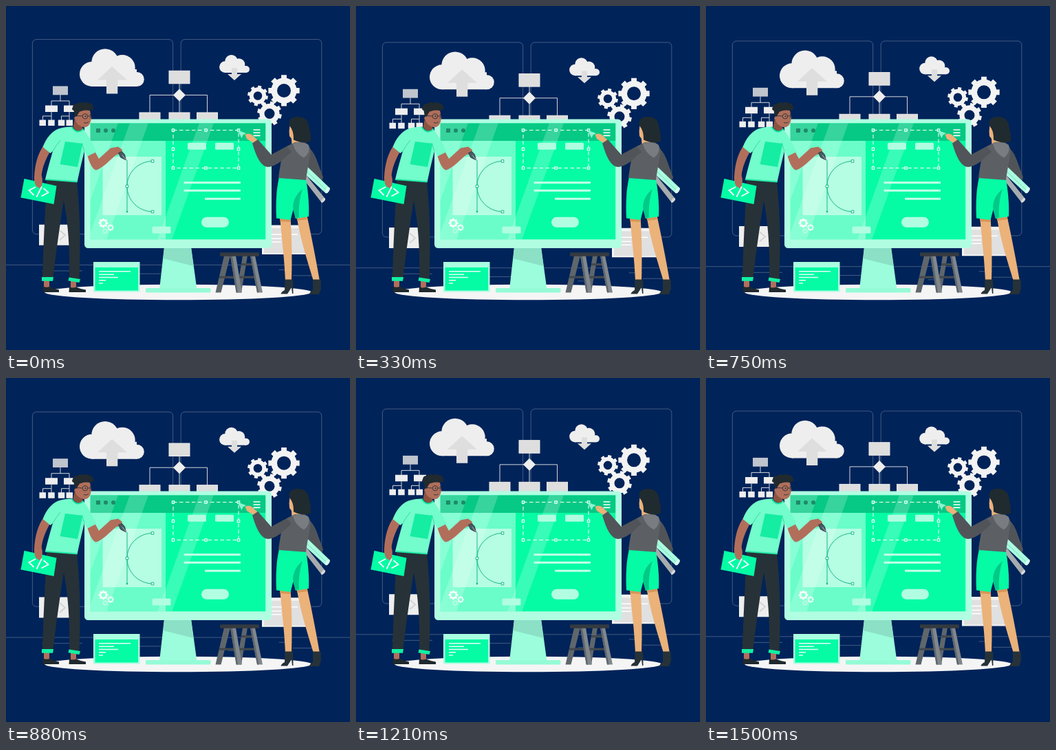
Write an HTML page that moves like this. It is 500 by 500 pixels and loops after 1540 ms.

```html
<!DOCTYPE html>
<html lang="en">
<head>
<meta charset="utf-8">
<title>Web design team</title>
<style>
  html, body { margin: 0; width: 100%; height: 100%; overflow: hidden; background: #002359; }
  svg { display: block; width: 100vw; height: 100vh; }
  .line { fill: none; stroke: #ebebeb; stroke-width: .9; }
  .thin { fill: none; stroke: #ebebeb; stroke-width: .5; stroke-opacity: .55; }
  .pale { fill: #eeeeee; }
  .box { fill: #dedede; stroke: #ebebeb; stroke-width: 1; }
  .green { fill: #06fba5; }
  .mint { fill: #b0fde2; }
  .dark { fill: #263238; }
  .brown { fill: #b16f5b; }
  .skin { fill: #ebb27a; }
  .stroke { fill: none; stroke: #fff; }
</style>
</head>
<body>
<svg viewBox="0 0 500 500" xmlns="http://www.w3.org/2000/svg">
  <g id="back">
    <rect class="thin" x="38.4" y="48.6" width="204.2" height="283" rx="5.7"/>
    <rect class="thin" x="254.2" y="48.6" width="204.6" height="283" rx="5.7"/>
    <path class="thin" d="M0 376.4H500M52.5 385H95.6M104.6 385h6.3M131.5 389.2h93.7M416.8 391.9h33.1M396.6 383.5h19.2M322.5 395.5h8.7"/>

    <!-- clouds -->
    <g class="pale">
      <path d="M125 117V92H190V117Z"/>
      <circle cx="125" cy="99" r="18"/>
      <circle cx="144" cy="82" r="19.7"/>
      <circle cx="169" cy="89.7" r="18.7"/>
      <circle cx="190.3" cy="106.5" r="10.5"/>
      <path d="M318 97V87H349V97Z"/>
      <circle cx="318.4" cy="88.7" r="8.3"/>
      <circle cx="327.6" cy="80.3" r="9.3"/>
      <circle cx="338.5" cy="85" r="8.8"/>
      <circle cx="349" cy="92" r="5"/>
    </g>
    <path fill="#dedede" d="M154 88L176 107.5H162.3V127.5H146V107.5H133ZM328 90h8v9h6l-10 9-10-9h6Z"/>

    <g id="gears" fill="#f3f3f3" fill-rule="evenodd"></g>

    <!-- flow charts -->
    <path class="line" d="M252 113V156M209 156V129.500H292.500V156"/>
    <path class="pale" d="M252 120.500l9 9-9 9-9-9Z"/>
    <rect class="box" x="237" y="94.300" width="30" height="18.500"/>
    <rect class="box" x="194" y="155" width="30" height="18"/>
    <rect class="box" x="237" y="155" width="30" height="18"/>
    <rect class="box" x="277.500" y="155" width="30" height="18"/>
    <path class="line" d="M79 129V138M66 145V138H92V145M66 154V160M53.500 166V160H66V166M92 154V160M80.500 166V160H92V166"/>
    <rect x="68" y="116.500" width="22" height="12.800" fill="#bfc4cd"/>
    <path class="pale" d="M57 144.500h18v9.500H57ZM84 144.500h18v9.500H84ZM48.500 165.500h9.500v8.500h-9.500ZM61.200 165.500h9.500v8.500h-9.500ZM75.800 165.500h9.500v8.500h-9.500ZM87.500 165.500h9.500v8.500h-9.500Z"/>

    <!-- cards -->
    <path class="pale" d="M48 317.800H95V347.800H48Z"/>
    <path d="M78 326l8 7-8 7" fill="none" stroke="#d4d4d4" stroke-width="2"/>
    <path fill="#f3f3f3" d="M372 318.500H438V361H372Z"/>
    <path fill="#e0e0e0" d="M375 323H436V359H375Z"/>
    <path class="stroke" stroke-width="1.500" d="M380 332H424M380 338H400M380 343H400"/>
  </g>

  <ellipse cx="250" cy="416" rx="194" ry="11.300" fill="#f5f5f5"/>

  <!-- monitor -->
  <path fill="#9bfddb" d="M230 350H269L277.500 412H223Z"/>
  <path fill="#8be0c5" d="M230 352H269L272.500 378L228.500 367Z"/>
  <rect x="203" y="410" width="94.500" height="6.500" rx="1.500" fill="#95fbd7"/>
  <rect class="mint" x="114" y="164.500" width="272" height="187.500" rx="5.500"/>
  <clipPath id="screen"><path d="M122.700 170.500H377.200V339.200H122.700Z"/></clipPath>
  <g clip-path="url(#screen)">
    <path class="green" d="M122 170H378V340H122Z"/>
    <path fill="#fff" opacity=".4" d="M122 196H232V340H122Z"/>
    <path fill="#05c984" d="M122 170H378V196H122Z"/>
    <path fill="#fff" opacity=".2" d="M122 170H163L122 284ZM180 170H207L146 340H122V331ZM281 170H302L241 340H220Z"/>
  </g>
  <g fill="#1d8a69">
    <path d="M131 178h6v6h-6Z"/><circle cx="145" cy="181" r="3"/><circle cx="156" cy="181" r="3"/>
  </g>
  <path class="stroke" stroke-width="1.600" d="M359.500 180H369.500M359.500 184.200H369.500M359.500 188.400H369.500"/>
  <path fill="#fff" opacity=".5" d="M140.500 219H226V304H140.500Z"/>
  <path d="M213 225.500C192 226 176 242 176 262S192 298.500 213 299M176 224V299" fill="none" stroke="#12b985"/>
  <circle cx="176" cy="299" r="1.300" fill="#12b985"/>
  <path fill="#fff" stroke="#12b985" d="M211.200 223.700h3.600v3.600h-3.600ZM211.200 297.200h3.600v3.600h-3.600ZM174.200 260.200h3.600v3.600h-3.600Z"/>
  <path class="stroke" stroke-width="1" stroke-dasharray="5.500 3.500" d="M243 180.500H338V235.500H243Z"/>
  <g id="handles" class="green" stroke="#fff" stroke-width="1.100"></g>
  <g class="mint">
    <rect x="264" y="198.700" width="27" height="10" rx="1.500"/>
    <rect x="304" y="198.700" width="27" height="10" rx="1.500"/>
    <rect x="284" y="306.700" width="40" height="15" rx="7.500"/>
    <rect x="212.500" y="320.500" width="27" height="10" rx="1.500"/>
  </g>
  <path d="M258.500 256.700H341M258.500 268.200H341M289 280.200H341" stroke="#c4ffea" stroke-width="3"/>
  <g id="cogs" fill-rule="evenodd"></g>

  <!-- small window -->
  <path fill="#a9fde0" d="M127 372H194.500V415.500H127Z"/>
  <path class="green" d="M129.500 380H192V413.500H129.500Z"/>
  <path stroke="#e4fff6" stroke-width="1.500" d="M135 385.800H181M135 390.300H157M135 394.500H163M135 398.800H145M135 403H141"/>

  <!-- stool -->
  <path fill="#5f666b" d="M344 363h7L342 416.500h-7ZM317 363h9L312.500 416.500H304.500Z"/>
  <path fill="#43494e" d="M342 374h18v3.200H342ZM310 392.500H367v3.200H310Z"/>
  <path fill="#80878c" d="M326 363h8L343 416.500h-8ZM355 363h7L373 416.500h-8Z"/>
  <path fill="#5f666b" d="M326 363h3L337 416.500h-2.500ZM355 363h2.500L367.500 416.500h-2.500Z"/>
  <rect x="311" y="358.300" width="57" height="5.500" rx="1.200" fill="#343a3f"/>

  <!-- man -->
  <g>
    <path class="brown" d="M55 398H63V410H55ZM94 400H102V411H94Z"/>
    <path fill="#1f292e" d="M54 407.500Q59 410 64 407.500Q69 411 77 412.500V416H53.500ZM92 408.500Q97 410.500 102 408.500Q108 411.500 116 412.500V416H91.500Z"/>
    <path class="dark" d="M59 252L103 255C107 290 109 340 106.500 397L92 395C93 350 90 315 84 283C78 320 74 350 68.500 395H53C54 350 57 300 59 252Z"/>
    <path fill="#11f0a2" d="M52 394H69L68 399.800H52ZM91.500 394.500L108 397L106.500 402L90.500 399.200Z"/>
    <path class="brown" d="M56 201L65 210C57 224 53 234 51.500 247L51 261Q46 265 41.500 260L41 249C42 230 46 214 56 201Z"/>
    <path class="brown" d="M118 216C121 228 126 238 131 238.500C140 236 151 224 160 216.500L167.500 214.500L169 209L163 204.500L152 206.500L135 222L129 211Z"/>
    <path fill="#73fccc" d="M96 175.500Q103 186 112 178.500L118 187Q125 198 131.500 212L118.500 218.500L114 211Q109 230 103.500 256L57 252Q61 235 68 211L64.500 214L53.500 205Q61 185 76 178.500Q85 175.500 96 175.500Z"/>
    <path d="M68 211Q73 202 79 195M114 211L110 199" fill="none" stroke="#3ed9a7"/>
    <path d="M95.500 175.500Q103 188 112.500 178.500" fill="none" stroke="#14e29c" stroke-width="2"/>
    <path d="M57 252L103.500 255.500" stroke="#22e9a6" stroke-width="2"/>
    <path fill="#15eda3" d="M86 197L111.500 200L104 234L78.500 230Z"/>
    <path fill="#8d5341" d="M100 163L97.500 176Q104 185 111 179V170Z"/>
    <path class="brown" d="M101 152Q110 149 122 152L124 162Q123 175.500 114 176.500Q105 175 101 167Z"/>
    <path fill="#202a2f" d="M100.500 166L99.500 158L98.500 152Q94.500 151 97 147Q97.500 142 103 142Q107 138.500 112 141Q117 138.500 121 141.500Q126 141 126.500 146Q129 149.500 124.500 151.500Q115 150.500 107 153.500L104 158Z"/>
    <circle cx="101.800" cy="163" r="2.500" class="brown"/>
    <g fill="none" stroke="#263238" stroke-width=".9">
      <circle cx="115" cy="160.300" r="3.700"/><path d="M103 159.500L111.300 160M118.700 160H123M122 157Q125 160 122 163.500M113 169.500Q118 171 120 168"/>
    </g>
    <circle cx="115.500" cy="160.300" r="1" fill="#263238"/>
    <path fill="#455a64" stroke="#263238" stroke-width=".8" d="M163.500 213.500L168.500 211.500L172.500 216L174.500 224L166.500 220Z"/>
    <path d="M169 216.500L174.300 223.500" stroke="#c7d0d4" stroke-width=".8"/>
    <path class="green" d="M26.500 251L73.500 261.500L69.500 288L21.500 278.500Z"/>
    <path class="stroke" stroke-width="1.800" d="M43 263L33.500 268L40.500 275M52 262.500L44.500 277.500M54.500 265L61.500 271L51.500 276.500"/>
    <path class="brown" d="M42 247L51.500 246Q54 253 52 261L49 265L44 262Q40 256 42 247Z"/>
  </g>

  <!-- woman -->
  <g>
    <path class="skin" d="M398 306H413.500C415.500 340 416 365 415 400H406C404.500 365 401 340 398 306ZM422.500 306L437.500 305C444 335 450 365 456 400H447C438 370 428 340 422.500 306Z"/>
    <path fill="#d69658" d="M398 308L413.500 310V314L398.500 313ZM422.500 308L437.500 306.500L438.500 310L423.500 312Z"/>
    <path fill="#263238" d="M405.500 397.500H417L417.500 418H416L415 409L409 418.500H399.500Q400 415.500 405 413ZM446 397.500H457.500L457.800 411L455 419H441Q441.500 415.500 446 413Z"/>
    <path fill="#505458" d="M437 204Q446 209 451 222L461 249L457 260L437 238Z"/>
    <path fill="#a6abae" d="M434 243L463.500 279.500L458.500 285.500L431 250Z"/>
    <ellipse cx="461" cy="282.500" rx="2" ry="4" transform="rotate(40 461 282.500)" fill="#d5d8da"/>
    <path fill="#aafde0" d="M438 233.500L470 264L464.500 272L433 243Z"/>
    <path d="M435.500 239L466 268" stroke="#78dcbc"/>
    <ellipse cx="467.300" cy="268" rx="2.500" ry="4.800" transform="rotate(35 467.300 268)" fill="#d8fff1"/>
    <path class="green" d="M397 249H435.500C439 268 441 288 440 306L421 309L417.500 296L413.500 311L393 308.500C392 285 393 266 397 249Z"/>
    <path fill="#00ca87" d="M431 266C420 275 416 286 417.500 296L421 309L426 307C425 292 427 278 431 266Z"/>
    <path class="skin" d="M412.500 173Q411 182 412 189L415 193L415.500 202H430L424 176Z"/>
    <path class="skin" d="M361 200L350 193L347.500 187Q352 184 357 187L366 195Z"/>
    <path fill="#5c6064" d="M408 204L420 198H434Q441 202 443 210C441 225 438 237 436 253L396 250C397 240 399 231 400 224Z"/>
    <path fill="#515559" d="M358 199.500L366 194L385.500 216L408 204L415 212L398 227Q383 237 375.500 232.500C367 227 362 213 358 199.500Z"/>
    <path fill="#797c80" d="M417 200Q429 195 440 202Q443 213 433 220.500Q420 214 417 200Z"/>
    <path fill="#202b30" d="M412 174Q409 161.500 424 161Q439 161 440.500 176Q444 189 442.500 197Q431 201 418 194.500Q418.500 181 412 174Z"/>
    <path fill="#8af5d2" d="M336.500 180.500L349 185L344.500 187.500L342.500 192Z"/>
  </g>
</svg>
<script>
const LOOP = 1540, FRAMES = 37, PEAK = 465;
const byId = id => document.getElementById(id);

// Cog outline with square teeth and a round hole.
function gear(x, y, r, hole, teeth = 8, turn = 0) {
  const body = r * .81, points = [];
  for (let i = 0; i < teeth; i++) {
    const a = (i / teeth) * 2 * Math.PI + turn, w = Math.PI / teeth;
    for (const [d, s] of [[body, -.54], [r, -.44], [r, .44], [body, .54], [body, 1]])
      points.push([x + d * Math.cos(a + s * w), y + d * Math.sin(a + s * w)].map(v => v.toFixed(2)).join(" "));
  }
  return `M${points.join("L")}ZM${x - hole} ${y}a${hole} ${hole} 0 1 0 ${2 * hole} 0a${hole} ${hole} 0 1 0 ${-2 * hole} 0Z`;
}

const cog = (fill, ...args) => `<path fill="${fill}" d="${gear(...args)}"/>`;

byId("gears").innerHTML =
  cog("#f3f3f3", 404, 123, 23, 10) +
  cog("#f3f3f3", 366, 130.5, 15, 6.3, 8, .2) +
  cog("#f3f3f3", 383, 156.5, 18, 7.5, 8, .25);

byId("cogs").innerHTML =
  cog("#f4fffb", 141.5, 315.5, 7, 3) +
  cog("#e8fff7", 152, 322, 5, 2.2) +
  cog("#b5fde4", 144, 327, 4, 1.8);

for (const x of [243, 290.5, 338])
  for (const y of [180.5, 208, 235.5])
    if (x !== 290.5 || y !== 208)
      byId("handles").innerHTML += `<rect x="${x - 1.7}" y="${y - 1.7}" width="3.4" height="3.4"/>`;

// The backdrop floats up and down by 10 px at constant speed, at 24 steps a second.
const back = byId("back"), start = performance.now();

function draw() {
  const t = (performance.now() - start) % LOOP;
  const step = Math.min(FRAMES - 1, Math.floor((t + 5) * .024));
  const phase = (step / FRAMES - PEAK / LOOP + 1) % 1;
  const y = -4 + 10 * Math.abs(2 * phase - 1);
  back.setAttribute("transform", `translate(0 ${y.toFixed(3)})`);
  requestAnimationFrame(draw);
}
draw();
</script>
</body>
</html>
```
